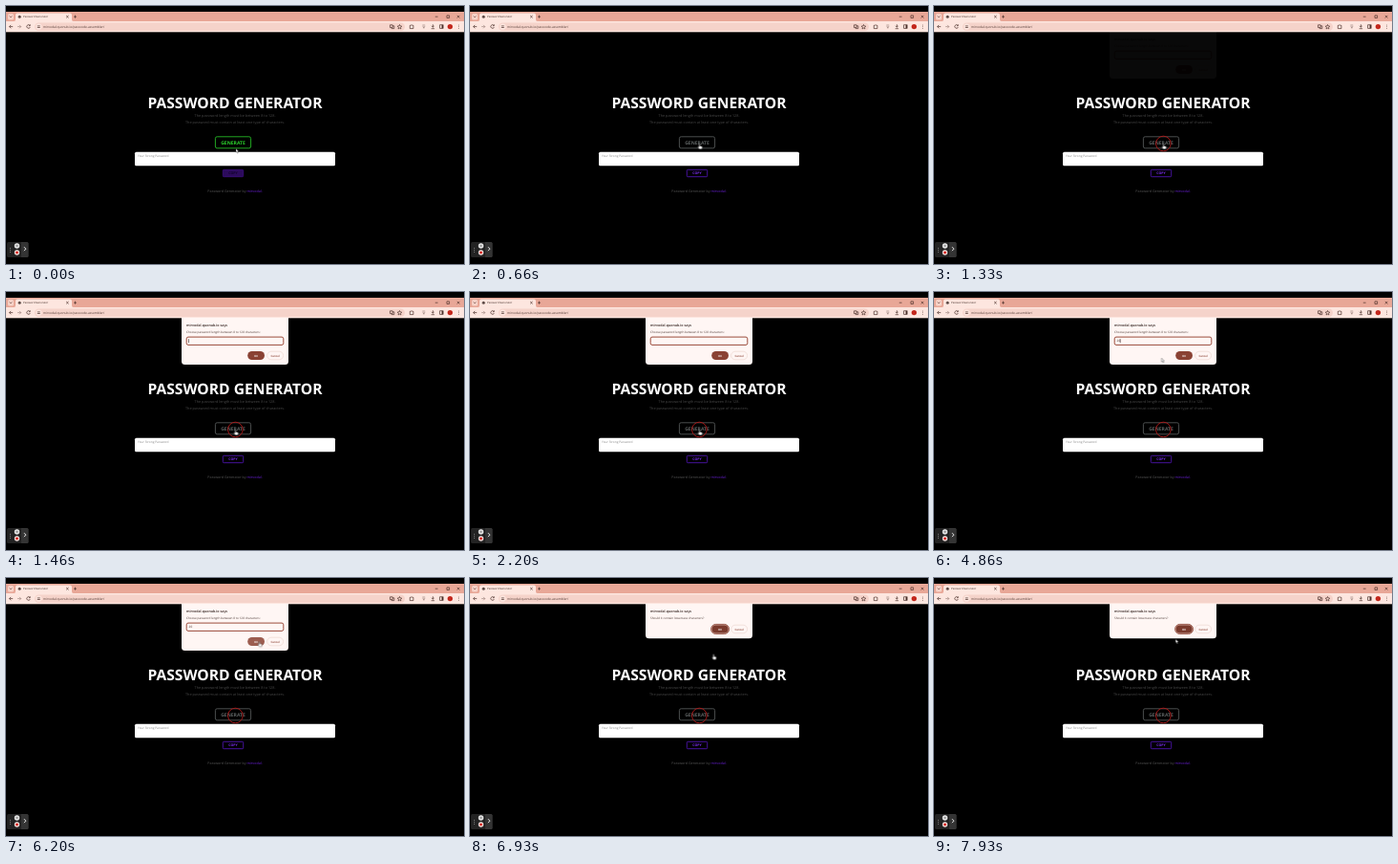
An HTML page that plays this animation: 480x270 px, repeating every 8 s.

```html
<!DOCTYPE html>
<html lang="en">
<head>
<meta charset="utf-8">
<title>Password Generator</title>
<style>
html, body { margin: 0; width: 100%; height: 100%; overflow: hidden; background: #000; }
svg { display: block; width: 100%; height: 100%; }
text { font-family: "Open Sans", "Noto Sans", sans-serif; text-rendering: geometricPrecision; }
.mid { text-anchor: middle; }
.bold { font-weight: 700; }
.line { fill: none; stroke: #4b302a; stroke-width: .7; }

.heading { font-size: 15.6px; fill: #fff; }
.hint { font-size: 3.8px; fill: #484848; }
.credit { font-size: 3.7px; fill: #555; }
.credit tspan { fill: #6a20d6; }
.says { font-size: 3.65px; font-weight: 600; fill: #30211e; }
.ask { font-size: 3.08px; fill: #4a3935; }
.label { font-size: 2.9px; font-weight: 600; }

.generate, .copy, .click, .prompt, .confirm, .cursor, .arrow, .hand, .typed, .caret-pos, .ok {
  animation: 8s linear infinite;
}
.generate rect { fill: #000; stroke: currentColor; stroke-width: .8; }
.generate text { font-size: 5.05px; fill: currentColor; }
.generate { animation-name: generate; }
@keyframes generate {
  0%, 1.5% { color: #2bd12b; }
  4.5%, 100% { color: #5d6262; }
}

.copy rect { stroke: #5818c4; stroke-width: .8; animation: copy-fill 8s linear infinite; }
.copy text { font-size: 3.55px; animation: copy-text 8s linear infinite; }
@keyframes copy-fill {
  0%, .5% { fill: #2c0b5c; stroke: #3d1080; }
  3.5%, 100% { fill: #000; stroke: #5818c4; }
}
@keyframes copy-text {
  0%, .5% { fill: #12042a; }
  3.5%, 100% { fill: #7a2cf0; }
}

.click { animation-name: click; animation-timing-function: step-end; }
@keyframes click { 0% { opacity: 0; } 14.5%, 100% { opacity: 1; } }

.prompt { animation-name: prompt; }
@keyframes prompt {
  0%, 16.5% { opacity: 0; }
  16.65% { opacity: .04; }
  18%, 79.6% { opacity: 1; }
  80.4%, 100% { opacity: 0; }
}
.confirm { animation-name: confirm; }
@keyframes confirm { 0%, 80.4% { opacity: 0; } 81.8%, 100% { opacity: 1; } }

.ok { fill: #8a4234; animation-name: ok; animation-timing-function: step-end; }
@keyframes ok { 0% { fill: #8a4234; } 71.5%, 100% { fill: #9c5d50; } }

.typed { animation-timing-function: step-end; }
.first { animation-name: first; }
.second { animation-name: second; }
@keyframes first { 0% { opacity: 0; } 56%, 100% { opacity: 1; } }
@keyframes second { 0% { opacity: 0; } 59%, 100% { opacity: 1; } }
.caret-pos { animation-name: caret-pos; animation-timing-function: step-end; }
@keyframes caret-pos {
  0% { transform: none; }
  56% { transform: translateX(1.9px); }
  59%, 100% { transform: translateX(3.7px); }
}
.caret { animation: blink 1s -550ms step-end infinite; }
@keyframes blink { 0% { opacity: 1; } 50%, 100% { opacity: 0; } }

.cursor { animation-name: cursor; animation-timing-function: ease-in-out; }
@keyframes cursor {
  0% { transform: translate(241px, 149.3px); }
  4%, 33% { transform: translate(240.5px, 144px); }
  42%, 62% { transform: translate(238.5px, 69.2px); }
  73%, 80.5% { transform: translate(265.5px, 66.3px); }
  85.5%, 90% { transform: translate(255.3px, 79.6px); }
  98%, 100% { transform: translate(253.3px, 64px); }
}
.arrow, .hand { animation-timing-function: step-end; }
.arrow { animation-name: arrow; }
.hand { animation-name: hand; }
@keyframes arrow {
  0% { opacity: 1; } 1.5% { opacity: 0; } 34.5% { opacity: 1; }
  71.5% { opacity: 0; } 91%, 100% { opacity: 1; }
}
@keyframes hand {
  0% { opacity: 0; } 1.5% { opacity: 1; } 34.5% { opacity: 0; }
  71.5% { opacity: 1; } 91%, 100% { opacity: 0; }
}
</style>
</head>
<body>
<svg viewBox="0 0 480 270">
  <rect width="480" height="270"/>

  <!-- Browser window -->
  <rect y="6" width="480" height="10" fill="#e8a797"/>
  <rect x="2" y="8" width="6" height="6.5" rx="1.6" fill="#f6d2c8"/>
  <path class="line" d="M3.8 10.6l1.2 1.2 1.2-1.2"/>
  <path d="M8.5 16q1.5 0 1.5-2V9.5q0-2 2-2h55q2 0 2 2V14q0 2 1.5 2z" fill="#fde6df"/>
  <circle cx="14.2" cy="11.3" r="1.5" fill="#5d4a46"/>
  <text x="18" y="12.3" font-size="2.75" fill="#3b2722">Password Generator</text>
  <path class="line" d="M63.2 10l2.4 2.4m0-2.4l-2.4 2.4M71 11.2h3M72.5 9.7v3"/>
  <path class="line" d="M449.8 11.2h2.8M462 9.9h2.6v2.6H462zM472.8 9.9l2.6 2.6m0-2.6l-2.6 2.6"/>

  <rect y="16" width="480" height="11.3" fill="#fde6df"/>
  <path class="line" d="M7.2 21.6H3.6m1.6-1.7l-1.7 1.7 1.7 1.7"/>
  <path class="line" stroke-opacity=".5" d="M12 21.6h3.6m-1.6-1.7l1.7 1.7-1.7 1.7"/>
  <path class="line" d="M25 20.4a1.8 1.8 0 1 0 .3 1.6M25.3 19.3v1.4h-1.4"/>
  <rect x="30" y="17.5" width="388" height="8.4" rx="4.2" fill="#f5d3ca"/>
  <circle cx="34.3" cy="21.7" r="3.1" fill="#fde6df"/>
  <path class="line" d="M32.8 20.9h3M32.8 22.5h3"/>
  <text x="39" y="22.9" font-size="3.3" fill="#4f3731">mirvodal.quonub.io/passcode-assembler/</text>
  <path class="line" d="M402.5 19.8h2.6v2.8h-2.6zM405.1 20.8h1.7v2.8h-2.6v-1"/>
  <path class="line" d="M412.5 19.5l.7 1.5 1.6.2-1.2 1.1.3 1.6-1.4-.8-1.4.8.3-1.6-1.2-1.1 1.6-.2z"/>
  <path class="line" d="M423.3 20.3h1.2q.6-1.4 1.2 0h1.2v3.3h-3.6z"/>
  <path class="line" stroke-opacity=".55" d="M436.4 20h2.8M436.8 20.9l1.1 2.4 1.1-2.4"/>
  <path class="line" d="M447.4 19.3v2.8m-1.4-1.3l1.4 1.4 1.4-1.4M445.7 23.7h3.4"/>
  <rect x="454.7" y="19.8" width="3.4" height="3.5" class="line"/>
  <rect x="456.6" y="19.8" width="1.5" height="3.5" fill="#4b302a"/>
  <circle cx="465.4" cy="21.6" r="2.7" fill="#c3271c"/>
  <g fill="#4b302a">
    <circle cx="474.5" cy="20" r=".45"/><circle cx="474.5" cy="21.6" r=".45"/><circle cx="474.5" cy="23.2" r=".45"/>
  </g>

  <!-- Page -->
  <text class="mid bold heading" x="240" y="106.6">PASSWORD GENERATOR</text>
  <text class="mid hint" x="240" y="116.1">The password length must be between 8 to 128.</text>
  <text class="mid hint" x="240" y="123.3">The password must contain at least one type of characters.</text>

  <g class="generate">
    <rect x="219.4" y="136.8" width="37.2" height="12" rx="1.8"/>
    <text class="mid bold" x="238" y="144.7">GENERATE</text>
  </g>

  <rect x="135" y="152.7" width="210" height="14.6" rx="1.6" fill="#fff"/>
  <text x="138" y="158.4" font-size="3.2" fill="#858585">Your Strong Password</text>

  <g class="copy">
    <rect x="227.3" y="171.3" width="21.4" height="7.4" rx="1"/>
    <text class="mid bold" x="238" y="176.3">COPY</text>
  </g>
  <text class="mid credit" x="240" y="195.4">Password Generator by <tspan>mirvodal.</tspan></text>

  <!-- Recorder -->
  <rect x="1" y="247" width="22.5" height="16" rx="1.5" fill="#232323"/>
  <path d="M16 247h6q1.5 0 1.5 1.5v13q0 1.5-1.5 1.5h-6z" fill="#343434"/>
  <path d="M4.5 253v5" stroke="#777" stroke-width="1" stroke-dasharray="1 1"/>
  <circle cx="11.5" cy="251" r="2.7" fill="#f1f1f1"/>
  <path d="M10.8 249.8v2.4m1.4-2.4v2.4" stroke="#333" stroke-width=".6"/>
  <circle cx="11.5" cy="258" r="2.7" fill="#f3e4e2"/>
  <rect x="10.2" y="256.7" width="2.6" height="2.6" rx=".5" fill="#d8241b"/>
  <path d="M19 252.2l1.8 2-1.8 2" fill="none" stroke="#fff" stroke-width=".9"/>

  <!-- Dialogs -->
  <g class="prompt">
    <path d="M184 27h112v45.5q0 3.5-3.5 3.5h-105q-3.5 0-3.5-3.5z" fill="#fff6f4"/>
    <text class="says" x="189" y="36.1">mirvodal.quonub.io says</text>
    <text class="ask" x="189" y="43.4">Choose password length between 8 to 128 characters:</text>
    <rect x="189.2" y="47.1" width="101.6" height="8.3" rx="1.8" fill="#fff6f4" stroke="#9b4c3c"/>
    <g font-size="3.1" fill="#3b2722">
      <text class="typed first" x="191.6" y="52.4">2</text>
      <text class="typed second" x="193.4" y="52.4">0</text>
    </g>
    <g class="caret-pos"><rect class="caret" x="191.4" y="49.2" width=".6" height="4" fill="#30211e"/></g>
    <rect class="ok" x="253.2" y="62" width="17.8" height="9" rx="4.5"/>
    <text class="mid label" x="262.1" y="67.6" fill="#fff">OK</text>
    <rect x="273.7" y="62.2" width="16.9" height="8.6" rx="4.3" fill="none" stroke="#ead2cc" stroke-width=".6"/>
    <text class="mid label" x="282.1" y="67.6" fill="#8a4234">Cancel</text>
  </g>
  <g class="confirm">
    <path d="M184 27h112v32.7q0 3.5-3.5 3.5h-105q-3.5 0-3.5-3.5z" fill="#fff6f4"/>
    <text class="says" x="189" y="36.1">mirvodal.quonub.io says</text>
    <text class="ask" x="189" y="43.4">Should it contain lowercase characters?</text>
    <rect x="252.6" y="48.4" width="19" height="10.2" rx="5.1" fill="#c79a8f" stroke="#8a4234" stroke-width=".8"/>
    <rect x="253.7" y="49.5" width="16.8" height="8" rx="4" fill="#7a3a2d"/>
    <text class="mid label" x="262.1" y="54.6" fill="#fff">OK</text>
    <rect x="273.7" y="49.2" width="16.9" height="8.6" rx="4.3" fill="none" stroke="#ead2cc" stroke-width=".6"/>
    <text class="mid label" x="282.1" y="54.6" fill="#8a4234">Cancel</text>
  </g>

  <circle class="click" cx="240.4" cy="144" r="7.8" fill="none" stroke="#b01a1a" stroke-width=".9"/>
  <g class="cursor" fill="#fff" stroke="#222" stroke-width=".35">
    <path class="arrow" d="M0 0v4l.9-.8.7 1.5.7-.3-.7-1.5h1.3z"/>
    <path class="hand" d="M-.5.5q.5-.6 1 0v1.9l2 .5q.5.2.4.8l-.5 2H-.1l-1.5-2q0-.8.8-.4l.3.3z"/>
  </g>
</svg>
</body>
</html>
```
